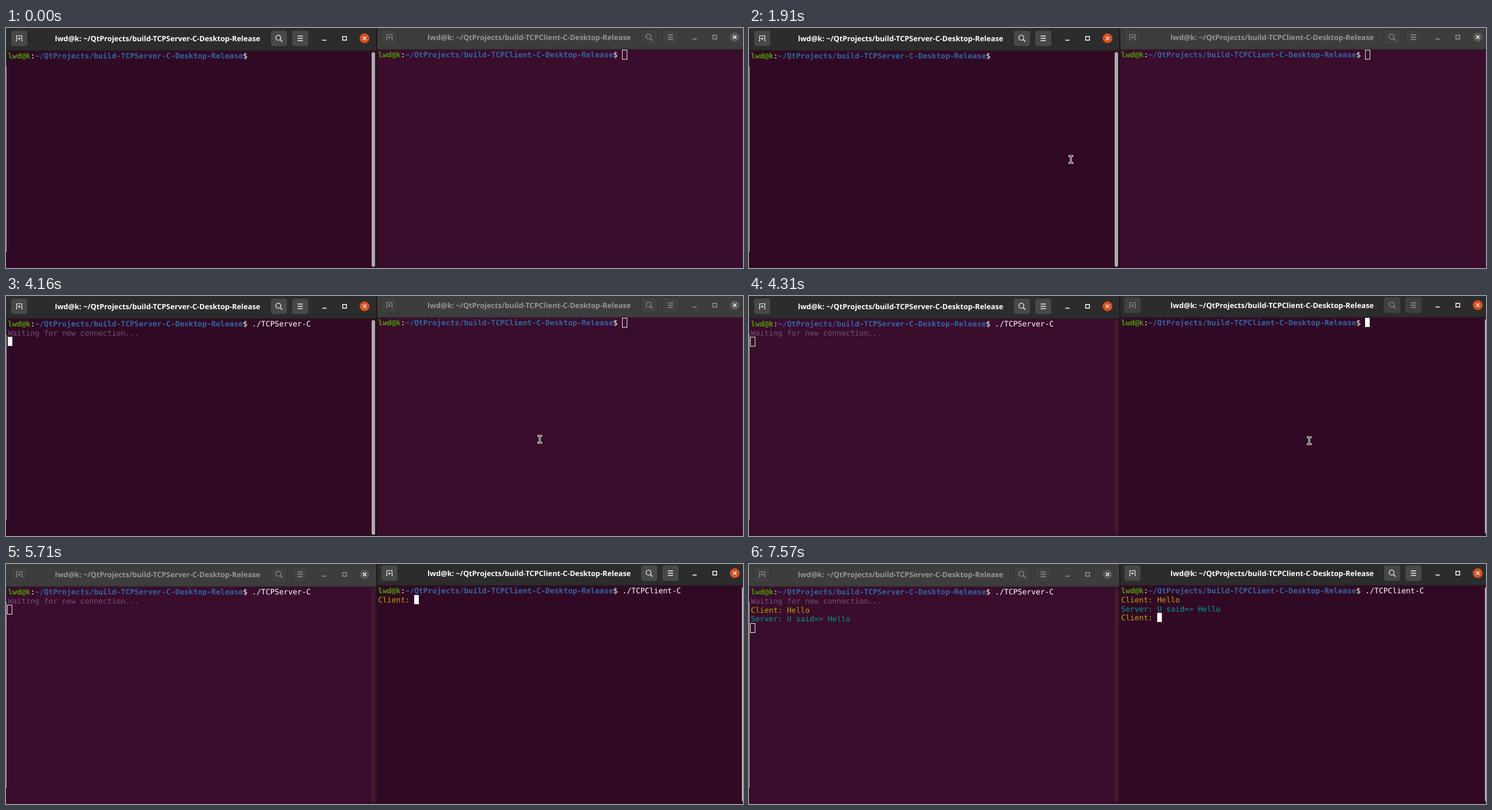
Animation, 1280 px wide and 418 px high, one loop 8 s. Source, as an HTML page:

```html
<!DOCTYPE html>
<html lang="en">
<head>
<meta charset="utf-8">
<title>Two terminals</title>
<style>
html, body { margin: 0; width: 100%; height: 100%; overflow: hidden; background: #222; }
svg { display: block; width: 100%; height: 100%; }
text { text-rendering: geometricPrecision; white-space: pre; }
.mono { font: 13.055px "DejaVu Sans Mono", monospace; }
.title { font: bold 12.77px "Noto Sans", "Open Sans", sans-serif; text-anchor: middle; }
.b { font-weight: bold; }
</style>
</head>
<body>
<svg id="stage" viewBox="0 0 1280 418"></svg>
<script>
const LOOP = 8000, TICK = 78;
const LEFT = 3.15, TOP = 40.4, CELL = 7.86, ROW = 15.7;
const FOCUS = 4235, FADE = 4310;
const GREEN = '#4e9a06', BLUE = '#3465a4', YELLOW = '#c4a000', CYAN = '#06989a', PLUM = '#75507b';
const stage = document.getElementById('stage');

const clamp = v => Math.max(0, Math.min(1, v));
const lerp = (a, b, k) => a + (b - a) * k;
const gray = v => `rgb(${Array(3).fill(Math.round(v)).join()})`;
const esc = s => s.replace(/&/g, '&amp;').replace(/</g, '&lt;').replace(/>/g, '&gt;');
const within = (t, a, b) => t >= a && t < b;
const rect = (x, y, w, h, fill, more = '') =>
  `<rect x="${x}" y="${y}" width="${w}" height="${h}" fill="${fill}" ${more}/>`;
const line = (d, color, width = 1.2) =>
  `<path d="${d}" fill="none" stroke="${color}" stroke-width="${width}"/>`;

// Latest value of a list of [time, value] pairs
const latest = (steps, t) => steps.reduce((v, s) => t >= s[0] ? s[1] : v, '');

const serverTyping = [[2230, '.'], [2380, './'], [2700, './T'], [3160, './TCPServer-C ']];
const clientTyping = [[4930, '.'], [5160, './'], [5310, './T'], [5560, './TCPClient-C ']];
const helloTyping = [[6640, 'H'], [6870, 'He'], [7100, 'Hel'], [7270, 'Hell'], [7340, 'Hello']];

function prompt(app, cmd) {
  return [['lwd@k', GREEN, 'b'], [':', '#fff'],
    [`~/QtProjects/build-${app}-C-Desktop-Release`, BLUE, 'b'], ['$ ' + cmd, '#fff']];
}

function server(t) {
  const rows = [prompt('TCPServer', latest(serverTyping, t))];
  if (t >= 3620) rows.push([['Waiting for new connection...', PLUM]], []);
  if (t >= 7570) {
    rows.pop();
    rows.push([['Client: Hello', YELLOW]], [['Server: U said=> Hello', CYAN]], []);
  }
  const off = t < 200 || within(t, 750, 1360) || within(t, 1910, 2230);
  return { app: 'TCPServer', titleX: 263.3, rows, off };
}

function client(t) {
  const rows = [prompt('TCPClient', latest(clientTyping, t))];
  if (t >= 5710) rows.push([['Client: ' + latest(helloTyping, t), YELLOW]]);
  if (t >= 7570) rows.push([['Server: U said=> Hello', CYAN]], [['Client: ', YELLOW]]);
  return { app: 'TCPClient', titleX: 265.6, rows, off: within(t, 6260, 6490) };
}

function caret(rows, off, focused) {
  const row = rows.length - 1;
  const col = rows[row].reduce((n, run) => n + run[0].length, 0);
  const x = LEFT + col * CELL, y = Math.floor(TOP + row * ROW);
  if (!focused) return rect(Math.floor(x - .5) + .5, y + .5, 8, 16, 'none', 'stroke="#eee"');
  return off ? '' : rect(Math.floor(x), y, 8, 16, '#fff');
}

const printRow = (runs, i) => `<text class="mono" x="${LEFT}" y="${TOP + 12.7 + i * ROW}">` +
  runs.map(([s, color, cls = '']) => `<tspan class="${cls}" fill="${color}">${esc(s)}</tspan>`).join('') + '</text>';

function button(x, k, icon) {
  const ink = gray(lerp(146, 240, k));
  return rect(x - 14.5, 4, 29, 28, gray(lerp(64, 72, k)), `rx="4" stroke="${gray(lerp(50, 40, k))}"`) +
    `<g transform="translate(${x} 18)">${icon(ink)}</g>`;
}

const tabIcon = c => line('M-6 4.5H-4.5V-4.5H4.5V4.5H6M-2.5 .5H2.5M0 -2V3', c);
const findIcon = c => `<circle cx="-1" cy="-1" r="4.3" fill="none" stroke="${c}" stroke-width="1.3"/>` +
  line('M2.2 2.2L6 6', c, 1.5);
const menuIcon = c => line('M-4.5 -4H4.5M-4.5 0H4.5M-4.5 4H4.5', c, 1.3);

// bar: how active the bar is; keys: how active its three buttons are
function header({ app, titleX }, bar, keys) {
  const ink = gray(lerp(150, 255, bar));
  return rect(0, 0, 643, 39.5, gray(lerp(61, 44, bar))) +
    rect(0, 38.5, 643, 1, gray(lerp(45, 32, bar))) +
    button(23, keys, tabIcon) + button(474, keys, findIcon) + button(511, keys, menuIcon) +
    `<text class="title" x="${titleX}" y="22.6" fill="${ink}">lwd@k: ~/QtProjects/build-${app}-C-Desktop-Release</text>` +
    line('M549.5 21.3H556.5', ink, 1.6) +
    line('M584.7 14.7H591.3V21.3H584.7Z', ink, 1.4) +
    `<circle cx="622.7" cy="18" r="8.3" fill="#575757"/>` +
    `<circle cx="622.7" cy="18" r="8.5" fill="#d9501e" opacity="${bar}"/>` +
    line('M619.7 15L625.7 21M625.7 15L619.7 21', '#fff', 1.4);
}

function terminal(win, focused, bar, keys) {
  return rect(0, 39, 643, 382, focused ? '#300a24' : '#390d2b') +
    rect(635, 42, 6, 374, focused ? '#aeaaad' : '#431933', 'rx="3"') +
    header(win, bar, keys) + win.rows.map(printRow).join('') + caret(win.rows, win.off, focused);
}

// The pointer moves in ticks and hides while typing
function pointer(t) {
  const glide = (start, ticks) => {
    const k = clamp((Math.floor((t - start) / TICK) + 1) / ticks);
    return 1 - (1 - k) ** 2;
  };
  let x, y;
  if (within(t, 130, 2300)) {
    const k = glide(130, 6);
    x = lerp(1150, 559, k);
    y = lerp(460, 229, k);
  } else if (within(t, 4080, 5000)) {
    const k = glide(4080, 3);
    x = lerp(559, 973, k);
    y = lerp(229, 252, k);
  } else return '';
  const d = 'M-2.5 -6H2.5M0 -6V6M-2.5 6H2.5';
  return `<g transform="translate(${x} ${y})" stroke-linecap="square">${line(d, '#fff', 3)}${line(d, '#111', 1)}</g>`;
}

function draw(t) {
  const right = t >= FOCUS, fade = clamp((t - FADE) / 310);
  return terminal(server(t), !right, 1 - fade, 1 - fade) +
    rect(0, 40, 1, 24, '#173a5e') + rect(0, 66, 1, 324, '#b5b2b4') +
    `<g transform="translate(643 -2)">${terminal(client(t), right, +right, right ? fade : 0)}</g>` +
    rect(643, 0, 2, 418, '#1e161b') + pointer(t);
}

let shown = '';
function tick(now) {
  const next = draw(now % LOOP);
  if (next !== shown) stage.innerHTML = shown = next;
  requestAnimationFrame(tick);
}
tick(performance.now());
</script>
</body>
</html>
```
